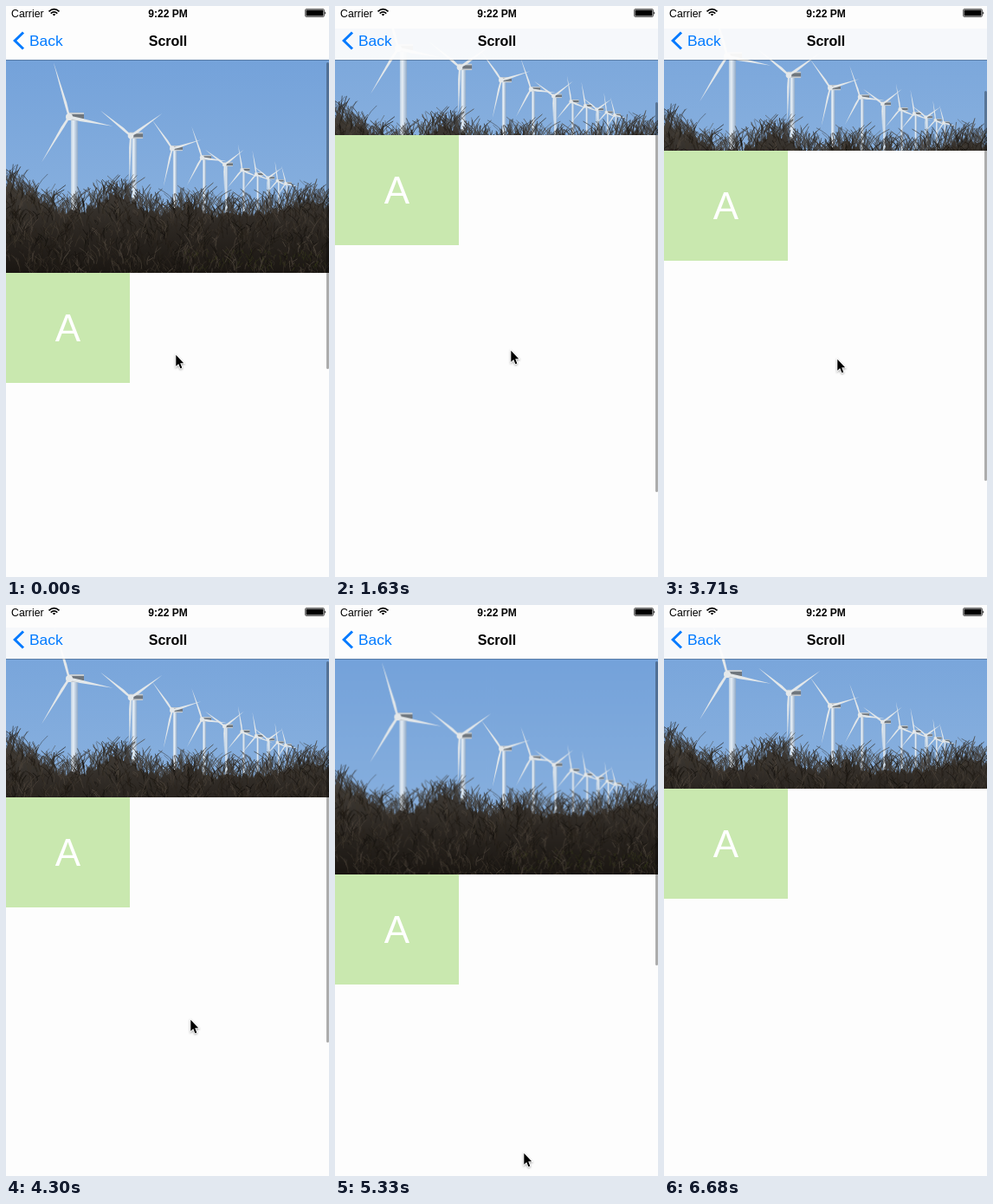
These frames come from a looping animation (373 by 659 pixels, 7.17 s). An HTML page with a canvas:

```html
<!DOCTYPE html>
<html lang="en">
<head>
<meta charset="utf-8">
<title>Scroll</title>
<style>
  html, body { margin: 0; width: 100%; height: 100%; overflow: hidden; background: #fdfdfd; }
  #stage { position: relative; width: 373px; height: 659px; overflow: hidden;
    font-family: "Liberation Sans", Arial, sans-serif; }
  #stage > * { position: absolute; left: 0; }
  #header { top: 26px; width: 373px; overflow: hidden; }
  #photo { position: absolute; }
  #cell { width: 143px; height: 127px; background: #c9e8af; color: #fff;
    font-size: 44px; line-height: 128px; text-align: center; }
  #stage > #bar { left: 370px; width: 2.5px; border-radius: 2px; background: rgba(0, 0, 0, .32); }
  #nav, #cursor { top: 0; overflow: visible; }
  #cursor { filter: drop-shadow(0 1px 1px rgba(0, 0, 0, .35)); }
</style>
</head>
<body>
<div id="stage">
  <div id="header"><canvas id="photo" width="373" height="248"></canvas></div>
  <div id="cell">A</div>
  <div id="bar"></div>
  <svg id="nav" width="373" height="63">
    <rect width="373" height="26" fill="#fdfdfd"/>
    <rect y="26" width="373" height="36" fill="#fdfdfd" fill-opacity=".95"/>
    <rect y="62" width="373" height="1" fill="#000" fill-opacity=".24"/>
    <text x="6" y="13" font-size="12.3">Carrier</text>
    <g fill="none" stroke="#000" stroke-width="1.7">
      <path d="M49.5 6.3Q55.5 1 61.5 6.3M51.7 8.6Q55.5 5.3 59.3 8.6"/>
      <path d="M53.6 9.6Q55.5 8.2 57.4 9.6L55.5 11.6Z" fill="#000" stroke="none"/>
    </g>
    <text x="187" y="13" font-size="12" font-weight="bold" text-anchor="middle">9:22 PM</text>
    <rect x="345.5" y="3.5" width="22" height="9" rx="1.5" fill="none" stroke="#666"/>
    <rect x="346.5" y="4.5" width="20" height="7"/>
    <path d="M368.3 6.2q2 1.8 0 3.6z"/>
    <path d="M20 30.5L10.2 40L20 49.5" fill="none" stroke="#007aff" stroke-width="3"/>
    <text x="27" y="46" font-size="17.4" fill="#007aff">Back</text>
    <text x="187" y="46" font-size="16" font-weight="bold" text-anchor="middle">Scroll</text>
  </svg>
  <svg id="cursor" width="14" height="20">
    <path d="M.3 .8V13.8L3.2 11.1L5.4 16.2L7.3 15.4L5.2 10.3H9.2Z" stroke="#fff" stroke-width="1.6" paint-order="stroke"/>
  </svg>
</div>
<script>
const $ = id => document.getElementById(id);
const NAV = 62, PHOTO_H = 248, FULL = NAV + PHOTO_H, REST = 212;

let seed = 7;
const random = () => (seed = seed * 16807 % 2147483647) / 2147483647;
const spread = size => (random() - .5) * size;

// Each bush is a bump on the hedge: centre, rise, width
const bushes = [[0, 34, 42], [128, 22, 28], [212, 10, 18], [350, 13, 34]];
const hedgeTop = x => bushes.reduce(
  (y, [centre, rise, width]) => y - rise * Math.exp(-(((x - centre) / width) ** 2)), 241);

// A row of turbines receding into the distance, each rotor seen from the side
const rotorAngles = [9, 92, 107, 6, 90, 18, 18, 92, 20, 12];

function drawTurbine(c, angle, index) {
  const size = 4.14 / (index + 4.14);
  const x = 438 - 365 * size, y = 241 - 112 * size;
  const width = 1.6 + 6.6 * size * size, left = x + 1 + 5 * size * size - width / 2;
  const shade = c.createLinearGradient(left, 0, left + width, 0);
  shade.addColorStop(0, "#b9cde2");
  shade.addColorStop(.35, "#e6eef5");
  shade.addColorStop(1, "#8fa9c7");
  c.fillStyle = shade;
  c.fillRect(left, y, width, 246 - y);
  c.fillStyle = "#c5cbd0";
  c.fillRect(x - 2, y - 5 * size, 4 + 15 * size, 9 * size);
  c.fillStyle = "#6f767d";
  c.fillRect(x, y - 3 * size, 2 + 15 * size, 5 * size);

  c.fillStyle = "#e4e8ea";
  const length = 68 * size, half = .4 + 2 * size;
  for (let blade = 0; blade < 3; blade++) {
    const turn = (angle + blade * 120) * Math.PI / 180;
    c.save();
    c.translate(x, y);
    c.scale(.75, 1);
    c.rotate(turn);
    c.beginPath();
    c.moveTo(0, half * .6);
    c.lineTo(length * .25, half);
    c.lineTo(length, 0);
    c.lineTo(length * .25, -half * .6);
    c.lineTo(0, -half * .6);
    c.fill();
    c.restore();
  }
  c.beginPath();
  c.arc(x, y, .6 + 3.4 * size, 0, 7);
  c.fill();
}

function drawTwigs(c, count, colours, depth, reach) {
  for (let i = 0; i < count; i++) {
    const x = random() * 385 - 6, y = hedgeTop(x) + 4 + random() * depth;
    const length = 6 + random() * reach, lean = spread(length * 1.5);
    c.strokeStyle = colours[Math.floor(random() * colours.length)];
    c.lineWidth = .4 + random() * .5;
    c.beginPath();
    c.moveTo(x, y);
    c.quadraticCurveTo(x + spread(10), y - length * .6, x + lean, y - length);
    c.moveTo(x + lean * .3, y - length * .45);
    c.lineTo(x + lean * .3 + spread(14), y - length * .8);
    c.stroke();
  }
}

function drawPhoto() {
  const c = $("photo").getContext("2d");
  c.translate(0, -NAV);
  const sky = c.createLinearGradient(0, NAV, 0, 245);
  sky.addColorStop(0, "#74a2da");
  sky.addColorStop(1, "#88b0de");
  c.fillStyle = sky;
  c.fillRect(0, NAV, 373, PHOTO_H);
  rotorAngles.forEach((angle, index) => drawTurbine(c, angle, index));

  drawTwigs(c, 620, ["#3a3733", "#4d4a47", "#2b2825"], 5, 27);
  const ground = c.createLinearGradient(0, 200, 0, FULL);
  ground.addColorStop(0, "#45413c");
  ground.addColorStop(.5, "#2d2823");
  ground.addColorStop(1, "#1a1612");
  c.fillStyle = ground;
  c.beginPath();
  c.moveTo(0, FULL);
  for (let x = 0; x <= 376; x += 2) c.lineTo(x, hedgeTop(x) + spread(10));
  c.lineTo(376, FULL);
  c.fill();
  drawTwigs(c, 1100, ["#16130f", "#211c16", "#4a4239", "#3b342b", "#2b251e"], 95, 14);
  c.strokeStyle = "#363b1b";
  for (let i = 0; i < 110; i++) {
    const x = 205 + random() * 165, y = 285 + random() * 22;
    c.beginPath();
    c.moveTo(x, y);
    c.lineTo(x + spread(7), y - 4);
    c.stroke();
  }
}

const progress = (step, from, to) => Math.min(1, Math.max(0, (step - from) / (to - from)));
function ease(step, from, to) {
  const p = progress(step, from, to);
  return p * p * (3 - 2 * p);
}

function bounce(height, elapsed) {
  const t = Math.max(0, elapsed);
  return REST - .5 + height * (1 + t) * Math.exp(-t);
}

// Bottom edge of the photo: spring back, scroll away, return, pull down, spring back
function edgeAt(step) {
  if (step < 8) return bounce(96.5, step - 1.9);
  if (step > 38) return bounce(102, step - 38.3);
  return REST - 198 * ease(step, 8, 16) + 153 * ease(step, 18, 25)
    + 45 * ease(step, 25, 27) + 102 * ease(step, 27.1, 37);
}

const barOpacity = step =>
  1 - progress(step, 16, 18) + progress(step, 18, 19) - progress(step, 43, 45);

// Pointer stops: step, x, y
const stops = [[0, 196, 402], [6, 204, 428], [8, 206, 470], [16, 199, 275], [18, 199, 275],
  [25, 200, 407], [32, 222, 532], [36, 218, 632], [39, 216, 680]];

function pointerAt(step) {
  const next = Math.max(1, stops.findIndex(stop => stop[0] >= step));
  const [from, x0, y0] = stops[next - 1], [to, x1, y1] = stops[next];
  const p = progress(step, from, to);
  return [x0 + (x1 - x0) * p, y0 + (y1 - y0) * p].map(Math.round);
}

function render(now) {
  const step = Math.min(45, Math.floor((now % 7170 + 8) / 148));
  const edge = Math.round(edgeAt(step));

  const height = Math.max(PHOTO_H, edge - NAV), width = 373 * height / PHOTO_H;
  const photo = $("photo").style;
  $("header").style.height = Math.max(0, edge - 26) + "px";
  photo.width = width + "px";
  photo.height = height + "px";
  photo.left = (373 - width) / 2 + "px";
  photo.top = NAV - 26 + Math.min(0, (edge - FULL) / 2) + "px";
  $("cell").style.top = edge + "px";

  const bar = $("bar").style;
  bar.top = 65 + Math.max(0, REST - edge) * .73 + "px";
  bar.height = Math.min(450, 662 - edge) + "px";
  bar.opacity = barOpacity(step);

  const [x, y] = pointerAt(Math.min(step, 39));
  $("cursor").style.transform = `translate(${x}px, ${y}px)`;
}

drawPhoto();
const start = performance.now();
function loop() {
  render(performance.now() - start);
  requestAnimationFrame(loop);
}
loop();
</script>
</body>
</html>
```
